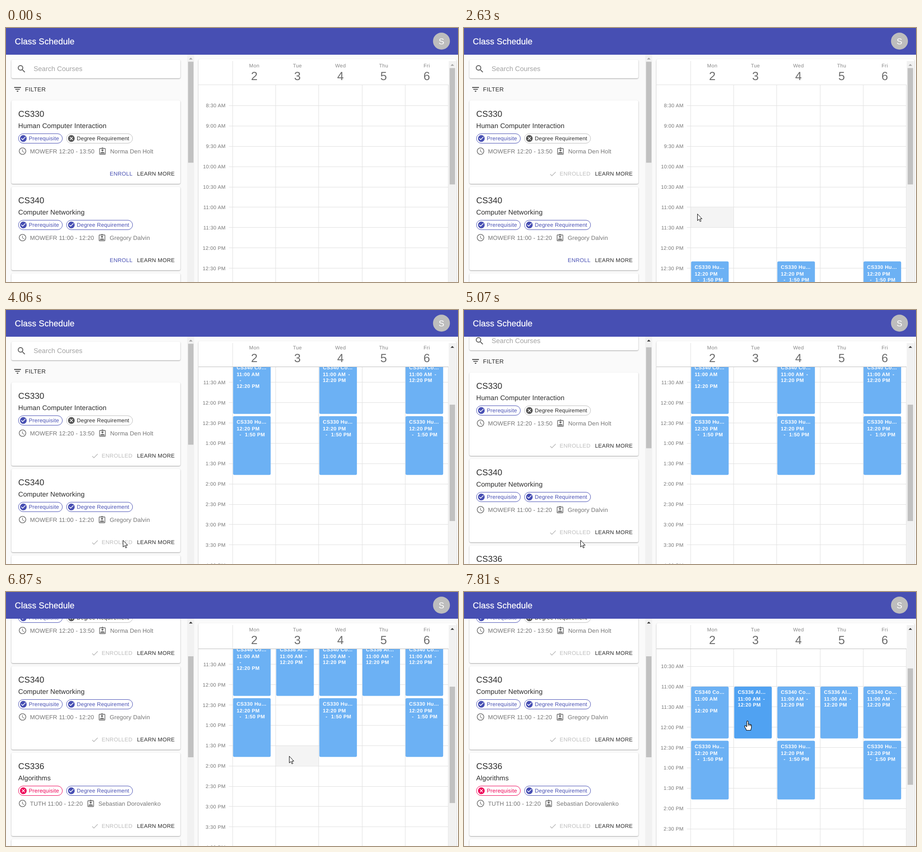
Write an HTML page that moves like this. It is 998 by 561 pixels and loops after 8000 ms.

```html
<!DOCTYPE html>
<html lang="en">
<head>
<meta charset="utf-8">
<title>Class Schedule</title>
<style>
  html, body { margin: 0; width: 100%; height: 100%; overflow: hidden; background: #fafafa; }
  #stage { display: block; width: 100vw; height: 100vh; }
  text { font-family: "Liberation Sans", Arial, sans-serif; text-rendering: geometricPrecision; white-space: pre; }
  .paper { fill: #fff; filter: drop-shadow(0 1px 1px rgba(0, 0, 0, .36)); }
</style>
</head>
<body>
<svg id="stage" viewBox="0 0 998 561"></svg>
<script>
const LOOP = 8000, BLUE = '#474fb3', PINK = '#ee0558', GRAY = '#757575', INK = '#2b2b2b';
const CARD_PITCH = 191, DAY_WIDTH = 95.2, ROW = 44.88, FIRST_ROW = 126.6;

const ICONS = {
  search: 'M15.5 14h-.79l-.28-.27A6.47 6.47 0 0 0 16 9.5 6.5 6.5 0 1 0 9.5 16c1.61 0 3.09-.59 4.23-1.57l.27.28v.79l5 4.99L20.49 19zM9.5 14a4.5 4.5 0 1 1 0-9 4.5 4.5 0 0 1 0 9z',
  filter: 'M10 18h4v-2h-4zM3 6v2h18V6zM6 13h12v-2H6z',
  done: 'M12 2a10 10 0 1 0 0 20 10 10 0 0 0 0-20zM10 17l-5-5 1.41-1.41L10 14.17l7.59-7.59L19 8z',
  cancel: 'M12 2a10 10 0 1 0 0 20 10 10 0 0 0 0-20zM17 15.59L15.59 17 12 13.41 8.41 17 7 15.59 10.59 12 7 8.41 8.41 7 12 10.59 15.59 7 17 8.41 13.41 12z',
  clock: 'M12 2a10 10 0 1 0 0 20 10 10 0 0 0 0-20zM12 20a8 8 0 1 1 0-16 8 8 0 0 1 0 16zM12.5 7H11v6l5.25 3.15.75-1.23-4.5-2.67z',
  badge: 'M19 3h-4.18a3 3 0 0 0-5.64 0H5a2 2 0 0 0-2 2v14a2 2 0 0 0 2 2h14a2 2 0 0 0 2-2V5a2 2 0 0 0-2-2zM19 19H5V5h14zM12 6a3 3 0 1 0 0 6 3 3 0 0 0 0-6zM6 18h12v-1.4c0-2-4-3.1-6-3.1s-6 1.1-6 3.1z',
  check: 'M9 16.17L4.83 12l-1.42 1.41L9 19 21 7l-1.41-1.41z'
};

const courses = [
  { code: 'CS330', title: 'Human Computer Interaction', time: 'MOWEFR 12:20 - 13:50', teacher: 'Norma Den Holt',
    teacherX: 230, chips: [['done', BLUE], ['cancel', '#555']], days: [0, 2, 4], from: 12 + 1 / 3, to: 13 + 5 / 6, enrolledAt: 1600 },
  { code: 'CS340', title: 'Computer Networking', time: 'MOWEFR 11:00 - 12:20', teacher: 'Gregory Dalvin',
    teacherX: 229, chips: [['done', BLUE], ['done', BLUE]], days: [0, 2, 4], from: 11, to: 12 + 1 / 3, enrolledAt: 4040 },
  { code: 'CS336', title: 'Algorithms', time: 'TUTH 11:00 - 12:20', teacher: 'Sebastian Dorovalenko',
    teacherX: 204, chips: [['cancel', PINK], ['done', BLUE]], days: [1, 3], from: 11, to: 12 + 1 / 3, enrolledAt: 6000 }
];

const text = (x, y, str, size, fill, spacing = .14, extra = '') =>
  `<text x="${x}" y="${y}" font-size="${size}" fill="${fill}" letter-spacing="${spacing}" ${extra}>${str}</text>`;
const rect = (x, y, w, h, fill, extra = '') =>
  `<rect x="${x}" y="${y}" width="${w}" height="${h}" fill="${fill}" ${extra}/>`;
const line = (x1, y1, x2, y2, extra = '') =>
  `<path d="M${x1} ${y1}L${x2} ${y2}" stroke="#e0e0e0" ${extra}/>`;
const icon = (name, cx, cy, scale, fill) =>
  `<path d="${ICONS[name]}" fill="${fill}" fill-rule="evenodd" transform="translate(${cx} ${cy}) scale(${scale}) translate(-12 -12)"/>`;
const paper = (x, y, w, h) => rect(x, y, w, h, '#fff', 'rx="3.5" class="paper"');
const hourY = hour => FIRST_ROW + (hour - 8) * 2 * ROW;

function chip(x, width, label, [name, color]) {
  const neutral = color === '#555';
  return rect(x + .5, 233.5, width - 1, 21, 'none', `rx="10.5" stroke="${neutral ? '#bdbdbd' : color}"`) +
    icon(name, x + 11.3, 244, .74, color) + text(x + 23.3, 248.2, label, 12.1, neutral ? INK : color, .2);
}

function card(c, i) {
  return `<g transform="translate(0 ${i * CARD_PITCH})">` + paper(12, 160, 373, 184) +
    text(27, 196.3, c.code, 18.6, INK) + text(27, 220.8, c.title, 14.9, INK) +
    chip(27, 98, 'Prerequisite', c.chips[0]) + chip(133, 147, 'Degree Requirement', c.chips[1]) +
    icon('clock', 36.5, 272, .81, GRAY) + text(53, 276.8, c.time, 13.03, GRAY) +
    icon('badge', c.teacherX - 17, 272.5, .8, GRAY) + text(c.teacherX, 276.8, c.teacher, 13.03, GRAY) +
    `<g id="enroll${i}">${text(229, 326.4, 'ENROLL', 12.1, BLUE, .35)}</g>` +
    `<g id="enrolled${i}">${icon('check', 196.3, 322.3, .74, '#b8b8b8')}${text(211.3, 326.4, 'ENROLLED', 12.1, '#bdbdbd', .35)}</g>` +
    text(289.3, 326.4, 'LEARN MORE', 12.1, INK, .35) + '</g>';
}

function eventBox(c, day) {
  const x = 501.4 + DAY_WIDTH * day, y = hourY(c.from);
  const start = c.from > 12 ? '12:20 PM' : '11:00 AM';
  const rest = c.from > 12 ? [[14, 44.2, '-'], [26, 44.2, '1:50 PM']]
    : day === 0 ? [[14, 44.2, '-'], [7.8, 57.2, '12:20 PM']]
    : [[64, 31, '-'], [7.8, 44.2, '12:20 PM']];
  const rows = [[7.8, 16.2, `${c.code} ${c.title.slice(0, 2)}…`], [7.8, 31, start], ...rest];
  return rect(x, y, 83, hourY(c.to) - y - 5, '#6cb1f4', `rx="3" id="${c.code}-${day}"`) +
    rows.map(([dx, dy, s]) => text(x + dx, y + dy, s, 11.17, '#fff', .33, 'font-weight="bold"')).join('');
}

function grid() {
  let out = rect(0, 0, DAY_WIDTH - 1, ROW - 1, '#f4f4f4', 'id="cell"');
  for (let k = 1; k < 24; k++) {
    const y = FIRST_ROW + k * ROW, hour = 8 + k / 2, h = Math.floor(hour);
    const label = `${h > 12 ? h - 12 : h}:${hour % 1 ? '30' : '00'} ${h < 12 ? 'AM' : 'PM'}`;
    out += line(492, Math.floor(y) + .5, 976, Math.floor(y) + .5) +
      text(485, y + 4, label, 11.17, GRAY, .37, 'text-anchor="end"');
  }
  for (let d = 0; d < 6; d++) {
    const x = Math.floor(500.5 + d * DAY_WIDTH) + .5;
    out += line(x, 126, x, 1300);
  }
  return out;
}

const dayHeads = ['Mon', 'Tue', 'Wed', 'Thu', 'Fri'].map((name, d) => {
  const x = 548.2 + d * DAY_WIDTH;
  return text(x, 87, name, 11.17, '#868686', .37, 'text-anchor="middle"') +
    text(x, 115, d + 2, 26, '#6c6c6c', 0, 'text-anchor="middle"');
}).join('');

const scrollbar = (id, x, y, thumbHeight) =>
  rect(x, y, 15.5, 561 - y, '#f1f1f1') +
  `<path id="${id}Arrow" d="M${x + 4} ${y + 10.5}h8l-4-4z"/>` +
  rect(x + 2, y + 15.5, 12, thumbHeight, '#c1c1c1', `id="${id}Thumb"`);

stage.innerHTML =
  rect(0, 0, 998, 561, '#fafafa') +
  `<svg y="59" width="400" height="502" viewBox="0 59 400 502"><g id="list">` +
    paper(12, 70, 373, 41) + icon('search', 34.4, 90.4, .93, '#5f5f5f') +
    text(61, 95.4, 'Search Courses', 14.9, '#a2a2a2', .07) +
    icon('filter', 25.5, 135.5, .83, INK) + text(42, 140.2, 'FILTER', 13.03, INK, .37) +
    courses.map(card).join('') + paper(12, 160 + 3 * CARD_PITCH, 373, 184) +
    rect(0, 0, 0, 27.5, BLUE, 'id="hover" rx="3.5"') + '</g></svg>' +
  scrollbar('list', 400, 59, 223) +
  paper(425, 69, 569, 520) +
  `<svg y="126" width="998" height="435" viewBox="0 126 998 435"><g id="calendar">` + grid() +
    courses.map((c, i) => `<g id="events${i}">${c.days.map(d => eventBox(c, d)).join('')}</g>`).join('') + '</g></svg>' +
  dayHeads + line(500.5, 73, 500.5, 126) + line(425, 125.5, 977, 125.5, 'id="headLine"') +
  scrollbar('cal', 977.5, 73, 257) +
  rect(0, 0, 998, 59, BLUE) + text(19.6, 35.6, 'Class Schedule', 18.7, '#fff', .14, 'stroke="#fff" stroke-width=".3"') +
  '<circle cx="961.5" cy="29" r="18.7" fill="#bdbdbd"/>' + text(961.5, 35.7, 'S', 18.6, '#fff', 0, 'text-anchor="middle"') +
  `<g id="cursor" fill="#fff" stroke="#000" stroke-linejoin="round">
    <path id="arrow" d="M.5 .7v14.8l3.4-3.2 2.4 5.3 2.2-1-2.3-5.1h4.4z"/>
    <g id="hand"><path stroke-width="1.1" d="M-1.6 13V2a1.6 1.6 0 0 1 3.2 0V8a1.4 1.4 0 0 1 2.6 .4 1.3 1.3 0 0 1 2.4 .6 1.2 1.2 0 0 1 2 1V15c0 2-1.5 3-1.5 6H-2.5C-2.5 18-6.3 14.5-6.6 12.3-6.6 10.3-4 10.3-1.6 13z"/>
    <path d="M1.6 8v3.5M4.2 8.6v3M6.6 9.3v2.6" stroke-width=".9"/></g>
  </g>`;

const el = id => document.getElementById(id);
const show = (id, on) => el(id).setAttribute('visibility', on ? 'visible' : 'hidden');
const clamp = v => Math.max(0, Math.min(1, v));
const easeOut = (t, from, to) => 1 - (1 - clamp((t - from) / (to - from))) ** 2;

// time, x, y
const path = [
  [580, 397, 541], [980, 246, 319], [2110, 246, 319], [2480, 495, 418], [2630, 515, 410],
  [3130, 515, 410], [3510, 362, 508], [3640, 258, 508], [4835, 258, 508], [4840, 257, 508],
  [5600, 257, 508], [5690, 258.5, 508.5], [6370, 258.5, 508.5], [6850, 625, 362], [6950, 625, 362],
  [7190, 630, 374], [7260, 630, 374], [7340, 630, 375], [7540, 630, 375], [7800, 626, 284.5], [LOOP, 626, 284.5]
];

function cursorAt(t) {
  const i = Math.max(1, path.findIndex(p => p[0] > t));
  const [t0, x0, y0] = path[i - 1], [t1, x1, y1] = path[i];
  const u = clamp((t - t0) / (t1 - t0)), s = u * u * (3 - 2 * u);
  return [x0 + (x1 - x0) * s, y0 + (y1 - y0) * s];
}

function buttonAt(x, y, t) {
  if (t > 5040 && t < 5600) return null;
  for (let i = 0; i < courses.length; i++) {
    const top = 308.5 + i * CARD_PITCH;
    if (y < top || y > top + 27.5) continue;
    if (x >= 225 && x < 285 && t < courses[i].enrolledAt) return { x: 225, y: top, w: 60, clickAt: courses[i].enrolledAt };
    if (x >= 285 && x < 378) return { x: 285, y: top, w: 93 };
  }
  return null;
}

function scrollTo(group, id, offset, ratio) {
  el(group).setAttribute('transform', `translate(0 ${-Math.round(offset)})`);
  el(id + 'Thumb').setAttribute('transform', `translate(0 ${offset / ratio})`);
  el(id + 'Arrow').setAttribute('fill', offset > 0 ? '#333' : '#a3a3a3');
}

function draw(t) {
  const listScroll = 187 * easeOut(t, 5046, 5460);
  const calScroll = 281 * easeOut(t, 2775, 3100) - 94 * easeOut(t, 6930, 7190);
  scrollTo('list', 'list', listScroll, 2.77);
  scrollTo('calendar', 'cal', calScroll, 2.33);
  el('headLine').setAttribute('stroke', calScroll > 0 ? '#bdbdbd' : '#e0e0e0');

  courses.forEach((c, i) => {
    const enrolled = t >= c.enrolledAt;
    show('enroll' + i, !enrolled);
    show('enrolled' + i, enrolled);
    show('events' + i, enrolled);
  });

  const [x, y] = cursorAt(t);
  const button = buttonAt(x, y + listScroll, t);
  show('hover', button);
  if (button) {
    el('hover').setAttribute('x', button.x);
    el('hover').setAttribute('y', button.y);
    el('hover').setAttribute('width', button.w);
    el('hover').setAttribute('opacity', button.clickAt - t < 80 ? .2 : .05);
  }

  // A hovered cell keeps its highlight while the grid scrolls beneath the pointer.
  const settled = t < 3100 ? 0 : t < 7190 ? 281 : 187;
  const day = Math.floor((x - 500.5) / DAY_WIDTH), row = Math.floor((y + settled - FIRST_ROW) / ROW);
  const algorithms = courses[2];
  const overEvent = t > 7540 && y + settled < hourY(algorithms.to) - 5;
  el('CS336-1').setAttribute('fill', overEvent ? '#50a2f2' : '#6cb1f4');
  show('cell', day >= 0 && !overEvent);
  el('cell').setAttribute('transform', `translate(${501 + day * DAY_WIDTH} ${FIRST_ROW + row * ROW + .5})`);

  const pointing = button || overEvent;
  el('cursor').setAttribute('transform', `translate(${x} ${y})`);
  show('arrow', t >= 600 && !pointing);
  show('hand', t >= 600 && pointing);
}

function tick() {
  draw(performance.now() % LOOP);
  requestAnimationFrame(tick);
}
tick();
</script>
</body>
</html>
```
